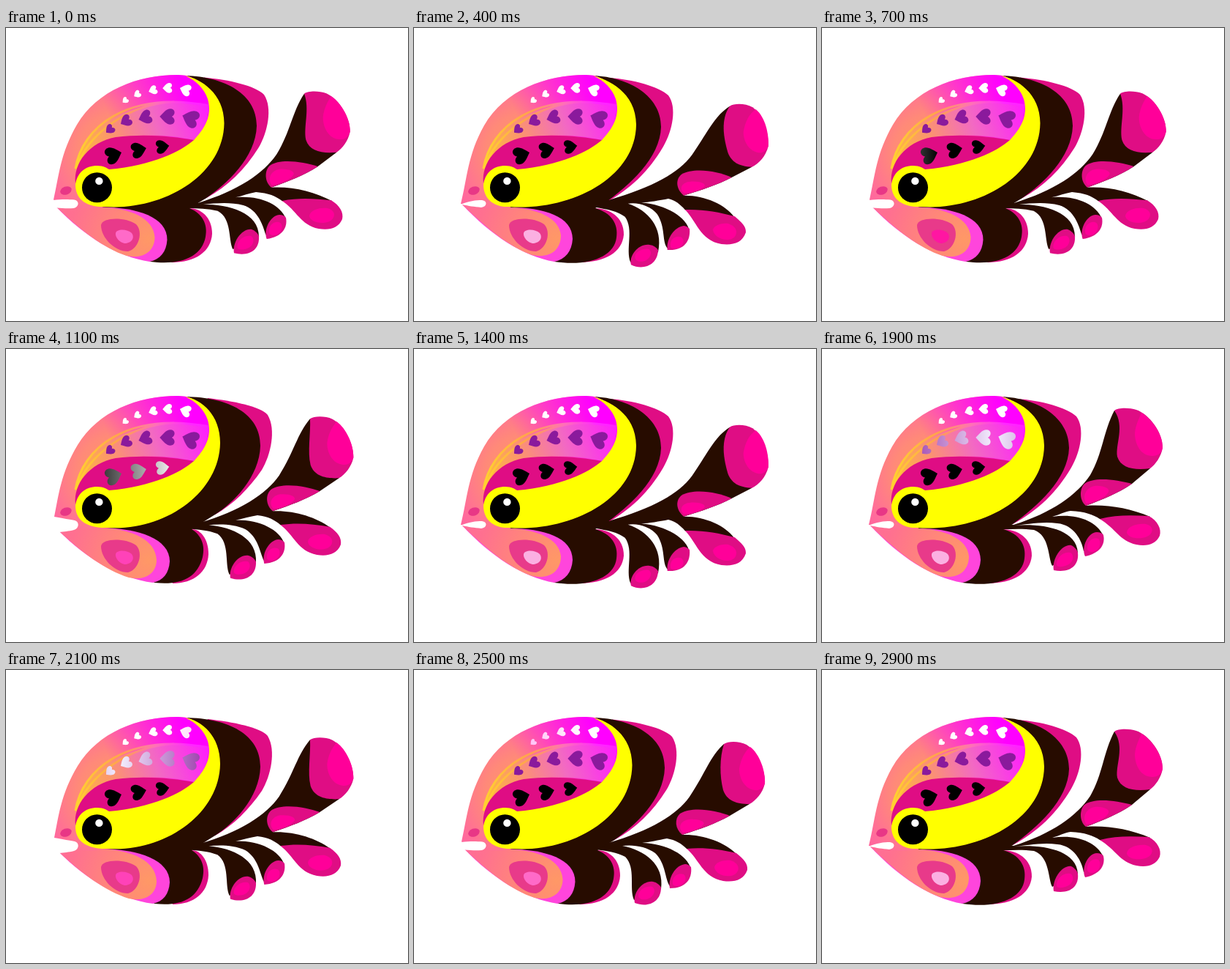
Write an HTML page with a canvas that moves like this. It is 550 by 400 pixels and loops after 3 s.

```html
<!DOCTYPE html>
<html lang="en">
<head>
<meta charset="utf-8">
<title>Swimming fish</title>
<style>
  html, body { margin: 0; width: 100%; height: 100%; overflow: hidden; background: #fff; }
  canvas { display: block; }
</style>
</head>
<body>
<canvas width="550" height="400"></canvas>
<script>
const ctx = document.querySelector('canvas').getContext('2d');
const DARK = '#270c00', PINK = '#df0d84', HOT = '#ff0099', YELLOW = '#ffff00';

// Pose cycles, one entry per 100 ms step
const TAIL = [0, 1, 2, 3, 3, 2, 1, 0, -1, -1];
const BODY = [0, 1, 0, -1, -1];
const CHEEK = ['#ff6ac8', '#ff42b8', '#ff16a2', '#ff62c4', '#fbb0e2'];

// Each part: colour, raised pose, lowered pose
const tailParts = [
  [DARK,
    'M240,236 L262,240 C314,224 349,199 367,172 C384,143 385,112 400,84 L420,90 L449,163 L424,184 C405,197 385,205 361,214 C390,212 420,217 449,229 L430,240 L380,232 C371,226 360,222 340,221 C332,222 325,226 315,229 C345,224 375,233 385,255 L358,276 C356,262 345,240 322,238 C300,235 280,240 262,241 C300,238 348,245 350,278 L315,296 C309,285 312,255 290,247 C275,245 262,246 248,246 L235,240Z',
    'M240,236 L266,236 C324,219 359,198 377,173 C400,138 405,118 424,101 L440,110 L459,183 L432,199 C412,210 392,217 367,225 C395,224 425,235 441,251 L430,260 L373,244 C366,237 358,232 346,230 C335,232 322,235 312,236 C345,237 374,252 379,272 L350,295 C343,285 345,265 330,250 C318,241 300,238 285,240 C315,246 343,265 338,299 L301,314 C294,298 304,270 289,255 C278,249 264,247 248,245 L235,240Z'],
  [PINK,
    'M400,84 C405,80 420,80 430,83 C448,89 467,115 466,135 C464,147 456,158 449,163 C428,166 409,163 404,147 C401,130 415,106 400,84Z',
    'M424,101 C430,97 445,97 455,102 C472,113 481,140 480,155 C477,168 468,178 459,183 C440,183 428,178 423,164 C418,145 418,120 424,101Z'],
  [HOT,
    'M437,87 C450,95 466,115 466,135 C464,142 460,146 452,146 C436,146 428,130 428,115 C429,103 434,95 437,87Z',
    'M460,105 C473,115 481,138 480,155 C477,161 473,165 466,164 C452,162 445,148 445,135 C447,122 452,112 460,105Z'],
  [PINK,
    'M424,184 C405,197 385,205 361,214 C352,207 352,191 359,184 C372,174 402,178 424,184Z',
    'M432,199 C412,210 392,217 367,225 C357,217 356,203 364,196 C380,186 412,191 432,199Z'],
  [HOT,
    'M362,211 C355,202 361,189 373,187 C384,186 394,190 392,195 C389,202 374,209 362,211Z',
    'M368,222 C360,215 365,205 377,204 C389,203 399,207 396,211 C391,217 379,221 368,222Z'],
  [PINK,
    'M380,232 C402,226 425,227 447,228 C459,234 465,246 462,255 C457,266 445,270 430,267 C407,262 402,245 380,232Z',
    'M373,244 C398,242 418,245 441,250 C451,258 457,264 456,273 C451,287 438,290 423,288 C395,283 390,258 373,244Z'],
  [HOT,
    'M417,250 C419,241 432,238 443,239 C452,241 454,248 449,253 C442,261 418,260 417,250Z',
    'M411,269 C413,262 424,259 433,260 C443,263 446,270 442,276 C435,286 412,281 411,269Z'],
  [PINK,
    'M385,254 C388,267 380,279 360,283 C354,271 364,250 376,250 C380,250 383,251 385,254Z',
    'M379,269 C381,285 372,298 350,298 C347,284 358,266 371,265 C374,265 377,267 379,269Z'],
  [HOT,
    'M363,271 C363,261 372,256 378,259 C383,263 380,276 370,277 C365,277 363,275 363,271Z',
    'M354,291 C353,281 362,276 369,279 C375,284 370,294 361,295 C356,295 354,294 354,291Z'],
  [PINK,
    'M350,278 C352,296 339,306 317,302 C314,287 328,266 341,268 C345,270 349,274 350,278Z',
    'M338,297 C338,317 320,325 302,318 C299,305 312,287 327,289 C332,290 336,293 338,297Z'],
  [HOT,
    'M321,294 C321,283 332,276 340,278 C346,282 344,293 333,296 C326,298 321,298 321,294Z',
    'M307,308 C307,300 318,294 326,296 C332,300 328,311 318,313 C311,314 307,312 307,308Z'],
];

const finParts = [
  [PINK,
    'M266,68 C300,70 335,80 348,92 C360,108 354,140 341,162 C321,196 296,220 261,239 L250,150Z',
    'M276,67 C310,71 348,78 358,90 C370,110 362,145 350,165 C333,190 311,212 286,226 L250,150Z'],
  [PINK,
    'M246,246 C268,246 287,258 287,282 C285,306 262,320 225,320 L220,280Z',
    'M254,246 C266,246 277,259 277,280 C276,304 257,320 228,320 L220,280Z'],
  [DARK,
    'M245,65 C295,67 338,93 338,135 C337,178 293,216 261,239 L248,246 C270,252 280,268 277,286 C274,312 240,326 192,319 L140,280 L130,244 L200,150Z',
    'M245,65 C305,66 348,88 348,132 C347,175 310,211 286,226 L254,246 C267,254 273,268 269,284 C262,312 240,323 203,319 L150,280 L130,244 L200,150Z'],
  ['#ff45dc',
    'M80,244 L130,245 C178,245 217,257 217,288 C216,305 207,316 192,319 C150,312 105,283 66,241Z',
    'M80,244 L130,244 C182,245 224,259 224,290 C223,306 215,316 201,319 C155,313 110,286 73,249Z'],
];

const JAW = ['M66,241 L95,240 L130,245 C168,246 199,259 201,283 C201,303 186,315 162,310 C130,299 98,272 66,241Z',
             'M73,249 L95,240 L130,244 C174,246 205,261 206,288 C206,305 192,317 168,312 C136,302 104,278 73,249Z'];
const HEAD = ['M64,240 C73,205 73,174 96,133 C124,85 180,64 235,64 L247,65 C290,80 296,120 257,153 L130,246 C110,248 85,246 64,240Z',
              'M66,229 C72,200 75,169 98,131 C126,85 180,64 235,64 L247,65 C290,80 290,120 257,153 L130,246 C110,248 85,246 66,229Z'];
const BAND = ['M245,65 C264,70 304,87 304,132 C303,205 215,250 130,244 C108,245 95,232 95,214 C97,198 108,188 125,188 C133,188 138,191 141,193 C200,188 240,168 257,153 C277,132 281,115 276,97 C271,82 260,72 245,65Z',
              'M245,65 C268,69 293,90 293,128 C292,198 215,249 140,244 C108,245 95,232 95,214 C97,198 108,188 125,188 C133,188 138,191 141,193 C200,188 240,168 257,153 C277,132 281,115 276,97 C271,82 260,72 245,65Z'];
const MOUTH = ['M58,241 L64,241 C75,236 85,235 93,235 C101,236 100,244 92,245 C82,244 75,243 66,241 L58,242Z',
               'M58,227 L66,229 C78,231 88,233 94,234 C101,236 100,245 93,247 C85,249 80,249 73,250 L58,254Z'];

function morph(from, to, k) {
  const ends = to.match(/[\d.]+/g);
  let i = 0;
  return new Path2D(from.replace(/[\d.]+/g, v => +v + (ends[i++] - v) * k));
}

function fill(path, style) {
  ctx.fillStyle = style;
  ctx.fill(typeof path === 'string' ? new Path2D(path) : path);
}

function oval(x, y, rx, ry, style, turn = 0) {
  ctx.beginPath();
  ctx.ellipse(x, y, rx, ry, turn, 0, 7);
  ctx.fillStyle = style;
  ctx.fill();
}

function withStops(gradient, ...stops) {
  stops.forEach(([at, colour]) => gradient.addColorStop(at, colour));
  return gradient;
}

const linear = (x1, y1, x2, y2, ...stops) => withStops(ctx.createLinearGradient(x1, y1, x2, y2), ...stops);
const radial = (x, y, r, ...stops) => withStops(ctx.createRadialGradient(x, y, 0, x, y, r), ...stops);

const headFill = radial(150, 170, 115, [0, '#ff9a60'], [.45, '#ff8a78'], [.85, '#ff6a9c'], [1, '#ff649c']);
const headGlow = linear(140, 120, 245, 80, [0, 'rgba(255,0,255,0)'], [1, '#ff00ff']);
const jawFill = radial(195, 288, 135, [0, '#ff9866'], [.35, '#ff8878'], [.8, '#ff7090'], [1, '#ff6c98']);
const midFill = linear(98, 170, 277, 105, [0, '#ffb83c'], [.3, '#fb9272'], [.6, '#f26ac2'], [1, '#ff1cff']);
const lineFill = linear(98, 0, 277, 0, [0, '#ffd030'], [.35, '#ffa050'], [.6, '#ff70b8'], [.85, '#ff28ff'], [1, '#ff20ff']);

// Hearts: x, y, direction of the tip in degrees, scale
const heart = new Path2D('M11,0 C6,-5 2,-11 -4,-11 C-11,-11 -12,-3 -6,0 C-12,3 -11,11 -4,11 C2,11 6,5 11,0Z');
function heartRow(...hearts) {
  const row = new Path2D();
  for (const [x, y, turn, size] of hearts)
    row.addPath(heart, new DOMMatrix().translate(x, y).rotate(turn).scale(size));
  return row;
}
const blackRow = heartRow([147, 173.5, -18, 1.05], [181.5, 166.5, -14, .97], [214, 162, -8, .85]);
const purpleRow = heartRow([142, 138.5, 140, .6], [164, 127, 150, .74], [190.5, 122, 162, .86], [221, 121, 180, .97], [252.5, 123.5, 200, 1.08]);
const whiteRow = heartRow([163, 99, 140, .4], [179.5, 90.5, 148, .46], [201, 85, 160, .56], [221, 82, 178, .62], [245.5, 84.5, 198, .72]);

function sheen(row, base, light, centre, reach) {
  fill(row, linear(centre - reach, 0, centre + reach, 0, [0, base], [.5, light], [1, base]));
}

function draw(step) {
  const tail = (TAIL[step % 10] + 1) / 3;
  const body = (BODY[step % 5] + 1) / 2;
  const part = (pair, style) => fill(morph(...pair, body), style);

  ctx.clearRect(0, 0, 550, 400);
  for (const [colour, ...pair] of finParts.slice(0, 2)) part(pair, colour);
  for (const [colour, from, to] of tailParts) fill(morph(from, to, tail), colour);
  for (const [colour, ...pair] of finParts.slice(2)) part(pair, colour);

  part(JAW, jawFill);
  part(HEAD, headFill);
  part(HEAD, headGlow);
  fill('M95,195 C102,140 165,90 277,104 C279,125 268,143 257,153 C200,141 120,140 95,195Z', midFill);
  ctx.strokeStyle = lineFill;
  ctx.lineWidth = 3;
  ctx.stroke(new Path2D('M95,192 C104,136 165,85 277,106 M96,192 C112,143 170,103 230,101'));
  fill('M95,212 C92,184 114,156 150,149 C190,144 230,148 257,153 C240,180 190,200 125,204Z', PINK);
  part(BAND, YELLOW);
  part(MOUTH, '#fff');

  oval(82, 222, 8, 5.5, '#e83786', -.35);
  oval(124.5, 217.8, 20.5, 20.5, '#000');
  oval(127.4, 208.9, 5.2, 5.2, '#fff');

  fill('M130,269 C132,258 164,258 178,268 C188,278 182,301 167,305 C148,305 130,286 130,269Z', '#e83a8a');
  fill('M150,280 C151,274 166,274 172,280 C177,287 171,294 162,294 C156,293 149,286 150,280Z', CHEEK[step % 5]);

  sheen(blackRow, '#000', '#fff', 30 + (step - 7) * 51, 130);
  sheen(purpleRow, '#8a1a9c', '#f4f0ff', 315 - (step - 17) * 40, 140);
  sheen(whiteRow, '#fff', '#ffb4f4', 310 - (step - 21) * 42, 90);
}

function tick() {
  draw(Math.floor(performance.now() % 3000 / 100));
  requestAnimationFrame(tick);
}
tick();
</script>
</body>
</html>
```
